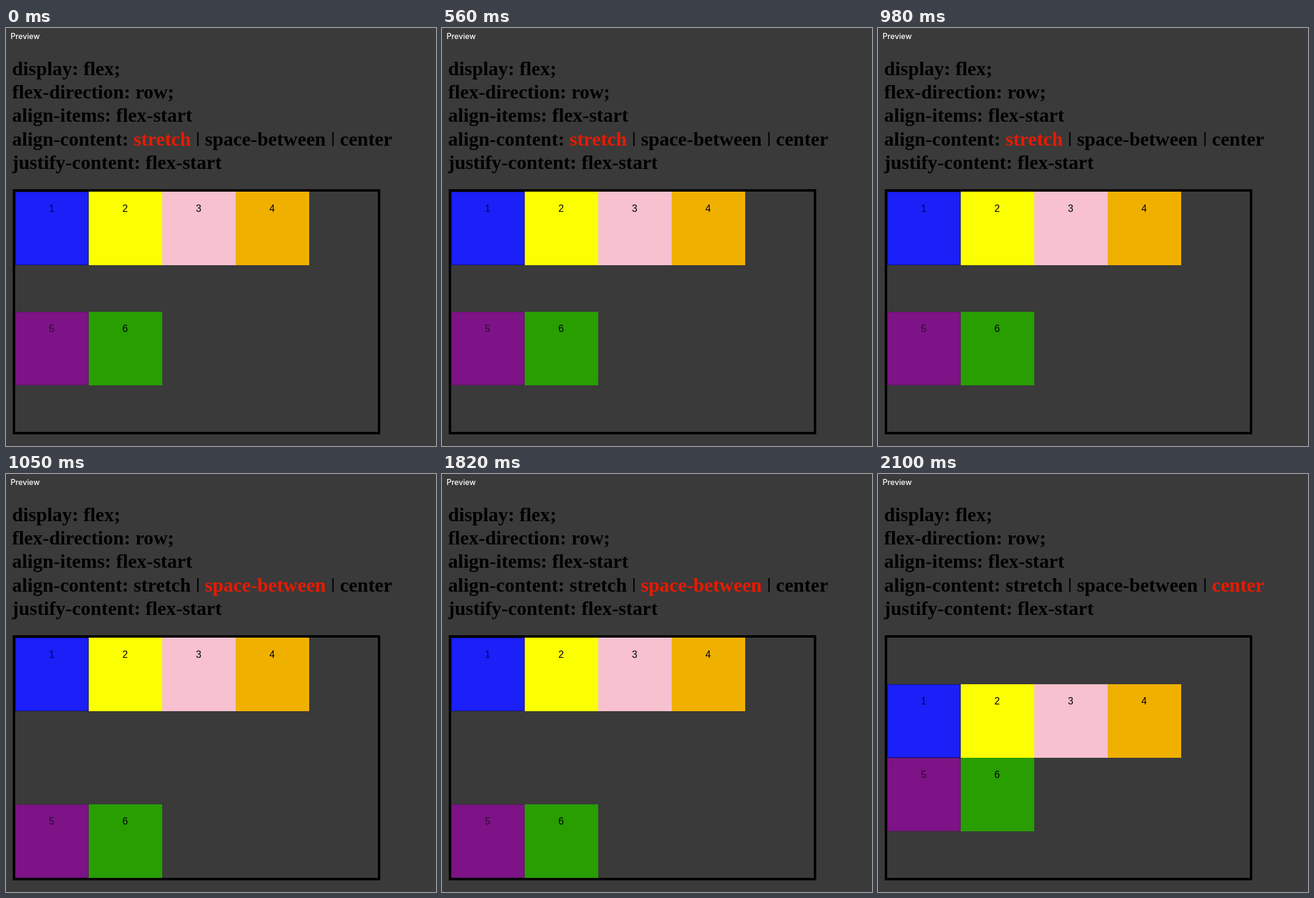
An HTML page that plays this animation: 702 px wide and 682 px high, repeating every 2170 ms.

```html
<!DOCTYPE html>
<html lang="en">
<head>
<meta charset="utf-8">
<title>align-content</title>
<style>
  html, body { margin: 0; width: 100%; height: 100%; overflow: hidden; background: #3a3a3a; }
  #label {
    position: absolute; left: 7.5px; top: 6px;
    font: 500 12.5px/16px Inter, sans-serif; color: #fff;
  }
  h1 {
    position: absolute; left: 10px; top: 46.9px; margin: 0; white-space: pre;
    font: bold 32px/38.2px "Liberation Serif", Times, serif; color: #000;
  }
  i { font-style: normal; clip-path: inset(0 0 7px); display: inline-block; }
  .on { color: #e81a00; }
  #box {
    position: absolute; left: 11px; top: 263px; width: 600px; height: 400px;
    box-sizing: border-box; border: 4px solid #000;
    display: flex; flex-flow: row wrap; align-items: flex-start; justify-content: flex-start;
  }
  #box div {
    width: 120px; height: 120px; box-sizing: border-box; padding-top: 19px;
    font: 16px/18px "Liberation Sans", Arial, sans-serif; text-align: center; color: #000;
    text-indent: -1px; background: var(--c);
  }
  #box .edged { box-shadow: inset 0 0 0 1px var(--edge); color: var(--ink); }
</style>
</head>
<body>
<div id="label">Preview</div>
<h1>display: flex;
flex-direction: row;
align-items: flex-start
align-content: <span>stretch</span> <i>|</i> <span>space-between</span> <i>|</i> <span>center</span>
justify-content: flex-start</h1>
<div id="box">
  <div class="edged" style="--c:#1b1ff8;--edge:#10127c;--ink:#04045c">1</div>
  <div style="--c:#fcff01">2</div>
  <div style="--c:#f7c1cf">3</div>
  <div style="--c:#f0b000">4</div>
  <div class="edged" style="--c:#7d1386;--edge:#5a1660;--ink:#2c0a30">5</div>
  <div style="--c:#289e00">6</div>
</div>
<script>
  const LOOP = 2170;
  const starts = [0, 1050, 2100]; // ms at which each value takes over
  const box = document.getElementById("box");
  const values = [...document.querySelectorAll("h1 span")];

  function draw(now) {
    const t = now % LOOP;
    const current = starts.filter(s => s <= t).length - 1;
    values.forEach((el, i) => el.classList.toggle("on", i === current));
    box.style.alignContent = values[current].textContent;
  }

  const origin = performance.now();
  function tick() {
    draw(performance.now() - origin);
    requestAnimationFrame(tick);
  }
  tick();
</script>
</body>
</html>
```
